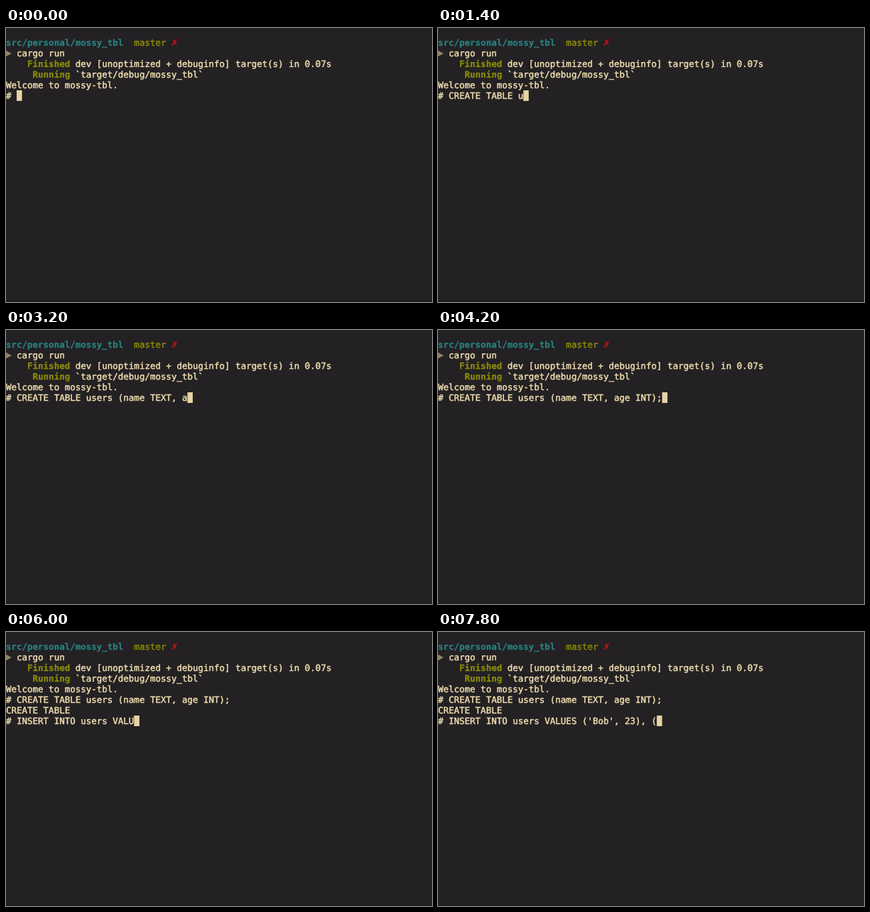
An HTML page with a canvas that plays this animation: 600 px wide and 387 px high, repeating every 8000 ms.

```html
<!DOCTYPE html>
<html lang="en">
<head>
<meta charset="utf-8">
<title>Terminal session</title>
<style>
html, body { margin: 0; width: 100%; height: 100%; overflow: hidden; background: #232123; }
canvas { display: block; }
</style>
</head>
<body>
<canvas id="term" width="600" height="387"></canvas>
<script>
const ctx = document.getElementById('term').getContext('2d');

const LOOP = 8000, TICK = 200;
const CELL_W = 7.515, CELL_H = 15, TOP = 13, BASELINE = 12;
const MONO = '"DejaVu Sans Mono", "Liberation Mono", monospace';
const SANS = '"DejaVu Sans", sans-serif';
const SIZE = CELL_W / 0.602;
const COLOR = {
  back: '#232123', edge: '#1b191b', text: '#f0ddae', cursor: '#e7d4a4',
  teal: '#2b8080', olive: '#8b8b0b', red: '#cc1010', arrow: '#928468'
};

const CREATE = 'CREATE TABLE users (name TEXT, age INT);';
const INSERT = "INSERT INTO users VALUES ('Bob', 23), (";
const ENTER = 22;

// [tick, characters typed]; typing is even between the points
const CREATE_KEYS = [[0, 0], [4, 8], [11, 23], [20, 40], [ENTER, 40]];
const INSERT_KEYS = [[ENTER, 0], [27, 18], [30, 22], [34, 30], [36, 35], [39, 39]];

function typedAt(keys, tick) {
  for (let i = 1; i < keys.length; i++) {
    const [t0, n0] = keys[i - 1], [t1, n1] = keys[i];
    if (tick <= t1) return Math.round(n0 + (n1 - n0) * (tick - t0) / (t1 - t0));
  }
  return keys[keys.length - 1][1];
}

// Each character sits on the cell grid; a thin outline gives the heavier weight
function print(row, col, text, color = COLOR.text, bold = false, family = MONO) {
  ctx.font = `${bold ? 'bold ' : ''}${SIZE}px ${family}`;
  ctx.fillStyle = ctx.strokeStyle = color;
  ctx.lineWidth = bold ? 0.25 : 0.45;
  const y = TOP + row * CELL_H + BASELINE;
  [...text].forEach((ch, i) => {
    if (ch === ' ') return;
    const x = (col + i) * CELL_W;
    ctx.fillText(ch, x, y);
    ctx.strokeText(ch, x, y);
  });
}

function drawArrow(row) {
  const mid = TOP + row * CELL_H + 8;
  ctx.fillStyle = COLOR.arrow;
  ctx.beginPath();
  ctx.moveTo(0, mid - 4.3);
  ctx.lineTo(8, mid);
  ctx.lineTo(0, mid + 4.3);
  ctx.fill();
}

function drawHeader() {
  print(0, 0, 'src/personal/mossy_tbl', COLOR.teal, true);
  print(0, 24, 'master', COLOR.olive);
  print(0, 30.9, '✗', COLOR.red, true, SANS);
  drawArrow(1);
  print(1, 2, 'cargo run');
  print(2, 4, 'Finished', COLOR.olive, true);
  print(2, 13, 'dev [unoptimized + debuginfo] target(s) in 0.07s');
  print(3, 5, 'Running', COLOR.olive, true);
  print(3, 13, '`target/debug/mossy_tbl`');
  print(4, 0, 'Welcome to mossy-tbl.');
}

function drawPrompt(row, text) {
  const line = '# ' + text;
  print(row, 0, line);
  ctx.fillStyle = COLOR.cursor;
  ctx.fillRect(line.length * CELL_W, TOP + row * CELL_H, CELL_W, CELL_H);
}

function draw(time) {
  const tick = Math.floor((time % LOOP) / TICK);
  ctx.textRendering = 'geometricPrecision';
  ctx.lineJoin = 'round';
  ctx.fillStyle = COLOR.back;
  ctx.fillRect(0, 0, 600, 387);
  ctx.fillStyle = COLOR.edge;
  ctx.fillRect(0, 386, 600, 1);
  drawHeader();
  if (tick < ENTER) {
    drawPrompt(5, CREATE.slice(0, typedAt(CREATE_KEYS, tick)));
  } else {
    print(5, 0, '# ' + CREATE);
    print(6, 0, 'CREATE TABLE');
    drawPrompt(7, INSERT.slice(0, typedAt(INSERT_KEYS, tick)));
  }
}

function loop() {
  draw(performance.now());
  requestAnimationFrame(loop);
}
loop();
</script>
</body>
</html>
```
